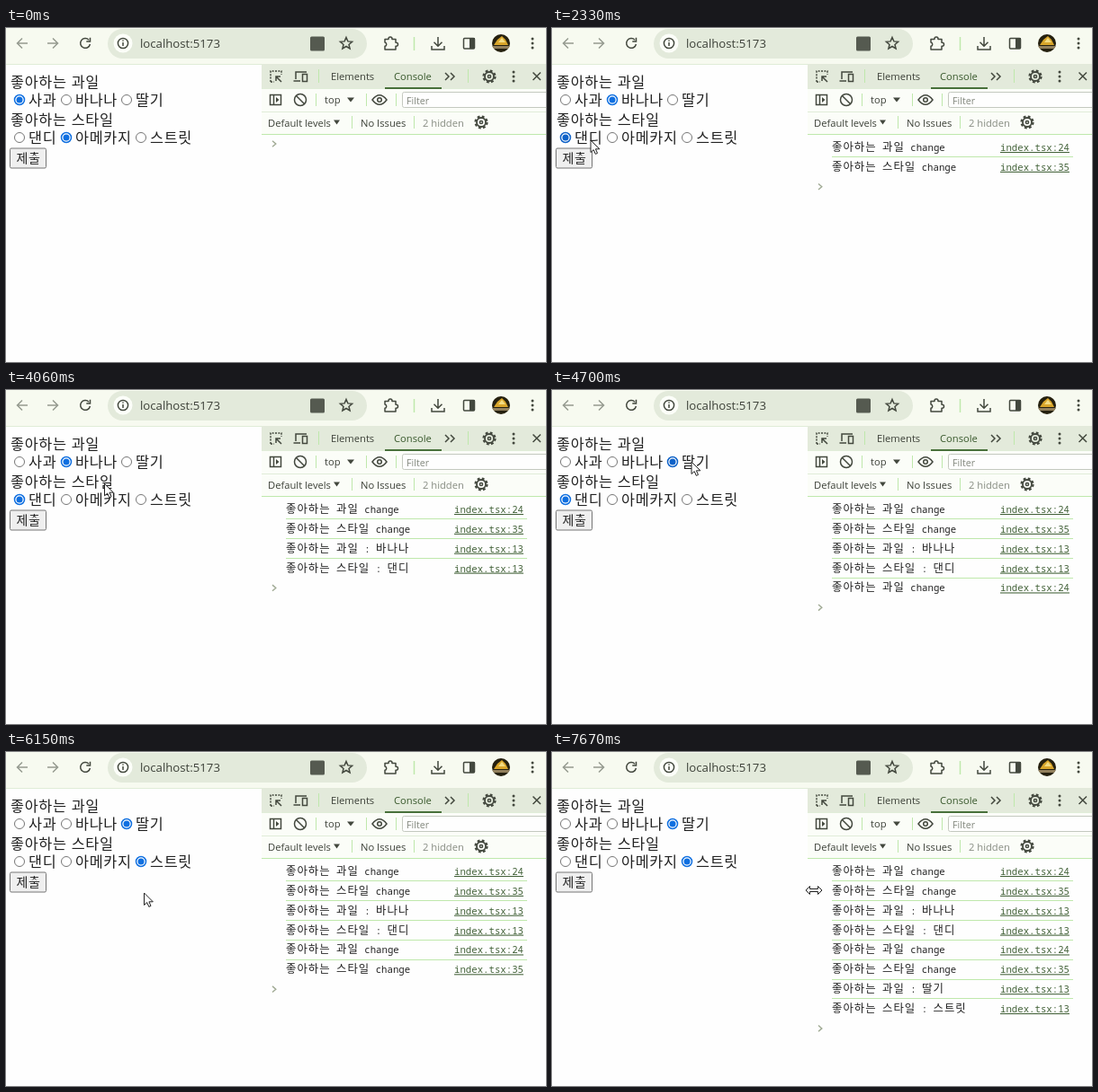
Recreate the animation shown at these times as an HTML page. Size 600 by 372 pixels, loop 7.7 s.

```html
<!DOCTYPE html>
<html lang="ko">
<head>
<meta charset="utf-8">
<title>Radio form</title>
<style>
html, body { margin: 0; width: 100%; height: 100%; overflow: hidden; background: #fefefe; }
svg { display: block; }
.ui { font: 11.2px "Open Sans", "Noto Sans", sans-serif; fill: #3c4038; }
.form { font: 16.3px "Noto Sans CJK KR", "Noto Sans CJK", sans-serif; letter-spacing: .65px; fill: #222; }
.log { font: 10.7px "Noto Sans Mono", "DejaVu Sans Mono", monospace; fill: #222; }
.log .ko { font: 12.4px "Noto Sans CJK KR", "Noto Sans CJK", sans-serif; letter-spacing: 1px; }
.link { fill: #44633a; text-decoration: underline; }
.icon { fill: none; stroke: #43483e; stroke-width: 1.5; }
.solid { fill: #43483e; stroke: none; }
.sep { stroke: #bfe8ac; fill: none; }
.edge { stroke: #e0edd8; fill: none; }
</style>
</head>
<body>
<svg width="600" height="372" viewBox="0 0 600 372">
  <defs>
    <g id="gear">
      <circle r="6.5" stroke-width="2.2" stroke-dasharray="2.8 2.3"/>
      <circle r="5" stroke-width="1.8"/><circle r="1.6"/>
    </g>
    <g id="dots" class="solid"><circle cy="-5" r="1.5"/><circle r="1.5"/><circle cy="5" r="1.5"/></g>
    <clipPath id="round"><circle cx="550" cy="17" r="10"/></clipPath>
  </defs>

  <!-- browser bar -->
  <rect width="600" height="40" fill="#f7faf0"/>
  <path class="edge" d="M0 40.5H600"/>
  <rect x="113" y="1" width="288" height="33" rx="16.5" fill="#e3eadb"/>
  <circle cx="130" cy="17" r="10.5" fill="#fcfef9"/>
  <g class="icon">
    <path style="stroke:#969b90" d="M24 17H13M18 11.5L12.5 17L18 22.5M46 17H57M52 11.5L57.5 17L52 22.5"/>
    <path d="M92 13.2A5.4 5.4 0 1 0 93.4 18M93.5 10.8V15H89.3"/>
    <circle cx="130" cy="17" r="5.6"/><path d="M130 16V20M130 13.4V14.8"/>
    <path d="M378 10.5L379.9 14.9L384.6 15.3L381 18.4L382.1 23L378 20.5L373.9 23L375 18.4L371.4 15.3L376.1 14.9Z"/>
    <path d="M421 12.5H425V12A2 2 0 0 1 429 12V12.5H433V16.3H433.5A2 2 0 0 1 433.5 20.3H433V24H421V20.3A2.2 2.2 0 0 0 421 16Z" stroke-linejoin="round"/>
    <path d="M480 10V20M475.5 15.8L480 20.3L484.5 15.8M473 20V24H487V20"/>
    <rect x="508.5" y="11.5" width="12" height="11.5" rx="1"/>
    <rect class="solid" x="515" y="11" width="6" height="12"/>
  </g>
  <rect x="338" y="9.5" width="16" height="16" rx="1.5" fill="#555a50"/>
  <path class="sep" d="M453.5 10V25" stroke-width="1.5"/>
  <g clip-path="url(#round)">
    <rect x="540" y="7" width="20" height="20" fill="#25200f"/>
    <path d="M542 19L546 13L551 9L555 13L558 19Z" fill="#d9a62b"/>
    <path d="M547 16L551 11L555 16Z" fill="#f3dc83"/>
    <rect x="540" y="20" width="20" height="3" fill="#92805c"/>
  </g>
  <use href="#dots" x="585" y="17"/>
  <text class="ui" x="149" y="22.3" style="font-size:13.2px">localhost:5173</text>

  <!-- developer tools -->
  <rect x="284" y="40" width="316" height="27.5" fill="#e3eadb"/>
  <rect x="284" y="67.5" width="316" height="51" fill="#fbfdf8"/>
  <path class="edge" d="M284 67.5H600M284 93.5H600"/>
  <path class="sep" d="M284 118.5H600"/>
  <path class="sep" d="M347.5 46V61M513.5 46V61M344.5 73V87M400.5 73V87M433.5 73V87M384.5 98V112M453.5 98V112"/>
  <rect x="421" y="66" width="63" height="2" fill="#48703a"/>
  <g class="icon">
    <path d="M294 60V48H306V52M294 60H298" stroke-dasharray="2 1.4"/>
    <path d="M306 60L300 54M300 59V54H305"/>
    <path d="M322 57V49H334M319.5 59H327"/><rect x="329.5" y="51.5" width="5" height="8"/>
    <path d="M488 50L492 54L488 58M494 50L498 54L494 58M585.5 49.5L594 58M594 49.5L585.5 58"/>
    <use href="#gear" x="537" y="54"/>
    <use href="#gear" x="528" y="105"/>
    <rect x="293.5" y="74.5" width="12" height="11"/><path d="M297.5 74.5V85.5"/>
    <path class="solid" d="M300 77L303.5 80L300 83Z"/>
    <circle cx="327" cy="80" r="6.5"/><path d="M322.5 75.5L331.5 84.5"/>
    <path d="M407 80Q415 69.5 423 80Q415 90.5 407 80Z"/><circle cx="415" cy="80" r="2.3"/>
    <path class="solid" d="M379 77.5H387L383 82.5ZM364 102.5H371L367.5 107.5Z"/>
  </g>
  <use href="#dots" x="564" y="54"/>
  <rect x="440.5" y="71.5" width="170" height="17" rx="2" fill="#fefefe" stroke="#c4c9bf"/>
  <g class="ui">
    <text x="361" y="58">Elements</text>
    <text x="431" y="58" style="fill:#38582c">Console</text>
    <text x="354" y="84">top</text>
    <text x="445" y="84.5" style="fill:#83887e;font-size:10.7px">Filter</text>
    <text x="291" y="109.8">Default levels</text>
    <text x="394" y="109.8">No Issues</text>
    <text x="463" y="109.8" style="fill:#878c82">2 hidden</text>
  </g>
  <g id="logs"></g>
  <path id="prompt" d="M296 -3.3L299.8 0L296 3.3" fill="none" stroke="#a0aa94" stroke-width="1.4"/>

  <!-- page -->
  <g class="form">
    <text x="5" y="65.5">좋아하는 과일</text>
    <text x="5" y="107.5">좋아하는 스타일</text>
    <g id="radios"></g>
    <rect id="button" x="4.5" y="134" width="40" height="22" rx="1.5"/>
    <text x="11.5" y="150.3" style="font-size:14px">제출</text>
  </g>

  <g id="cursor" fill="#fff" stroke="#222" stroke-linejoin="round">
    <path id="arrow" d="M0 0V13.5L3.2 10.6L5.3 15.4L7.5 14.4L5.4 9.8H9.8Z"/>
    <path id="resize" d="M-9 0L-4.5 -4.5V-1.5H4.5V-4.5L9 0L4.5 4.5V1.5H-4.5V4.5Z"/>
  </g>
</svg>
<script>
const LOOP = 7700, ROW = 21.86;
const $ = id => document.getElementById(id);
const set = (el, attrs) => { for (const k in attrs) el.setAttribute(k, attrs[k]); };
const show = (el, on) => { el.style.display = on ? '' : 'none'; };

// label, x, y, checked from, checked until
const radios = [
  ['사과', 15, 80, 0, 1150], ['바나나', 67, 80, 1150, 4610], ['딸기', 134, 80, 4610, LOOP],
  ['댄디', 15, 122, 2060, 5500], ['아메카지', 67, 122, 0, 2060], ['스트릿', 150, 122, 5500, LOOP]
].map(([label, x, y, from, to]) => {
  $('radios').insertAdjacentHTML('beforeend',
    `<g><circle cx="${x}" cy="${y}" r="5.5" fill="#fff"/><circle cx="${x}" cy="${y}" r="3.5"/>
     <text x="${x + 10}" y="${y + 6.2}">${label}</text></g>`);
  const [ring, dot] = $('radios').lastElementChild.children;
  return { ring, dot, x, y, from, to, right: x + 10 + label.length * 15.6 };
});

// time, message, source line
const logs = [
  [1150, '과일 change', 24], [2060, '스타일 change', 35],
  [3000, '과일 : 바나나', 13], [3000, '스타일 : 댄디', 13],
  [4610, '과일 change', 24], [5500, '스타일 change', 35],
  [6970, '과일 : 딸기', 13], [6970, '스타일 : 스트릿', 13]
].map(([time, text, line], i) => {
  const y = 137 + ROW * i;
  const body = ('좋아하는 ' + text).replace(/[가-힣]+/g, s => `<tspan class="ko">${s}</tspan>`);
  const rule = i ? `<path class="sep" d="M311 ${Math.round(y - 15.6) + .5}H579"/>` : '';
  $('logs').insertAdjacentHTML('beforeend',
    `<g class="log">${rule}<text x="311" y="${y}">${body}</text>
     <text class="link" x="498" y="${y}">index.tsx:${line}</text></g>`);
  return { time, el: $('logs').lastElementChild };
});

// time, x, y of the pointer
const path = [
  [30, 114, -6], [760, 90, 83], [1420, 90, 83], [1980, 43, 125], [2330, 43, 125],
  [2580, 43, 140], [3560, 43, 140], [4450, 155, 80], [4800, 155, 80], [5350, 155, 120],
  [5680, 155, 120], [6090, 153.5, 157], [6160, 153.5, 157], [6800, 42, 141], [7080, 42, 141],
  [7600, 291, 154], [LOOP, 291, 154]
];

function pointer(t) {
  const i = Math.max(1, path.findIndex(p => p[0] > t));
  const [t0, x0, y0] = path[i - 1], [t1, x1, y1] = path[i];
  const u = Math.max(0, (t - t0) / (t1 - t0)), e = u * u * (3 - 2 * u);
  return [x0 + (x1 - x0) * e, y0 + (y1 - y0) * e];
}

function draw(t) {
  const [px, py] = pointer(t);
  const over = (x0, y0, x1, y1) => px >= x0 && px <= x1 && py >= y0 && py <= y1;

  for (const r of radios) {
    const on = t >= r.from && t < r.to;
    const hover = over(r.x - 6, r.y - 10, r.right, r.y + 10);
    const color = on ? (hover ? '#0f62c8' : '#0f6fe0') : (hover ? '#4f4f4f' : '#767676');
    set(r.ring, { stroke: color, 'stroke-width': on ? 1.5 : 1 });
    set(r.dot, { fill: color });
    show(r.dot, on);
  }

  const hot = over(4, 134, 45, 156);
  set($('button'), { fill: hot ? '#e4e4e4' : '#efefef', stroke: hot ? '#4f4f4f' : '#767676' });

  let count = 0;
  for (const l of logs) {
    show(l.el, t >= l.time);
    count += t >= l.time;
  }
  set($('prompt'), { transform: `translate(0 ${count ? 133 + ROW * count : 129})` });

  const wide = px > 281;
  show($('cursor'), t >= 30);
  show($('arrow'), !wide);
  show($('resize'), wide);
  set($('cursor'), { transform: `translate(${px} ${py})` });
}

const start = performance.now();
function tick() {
  draw((performance.now() - start) % LOOP);
  requestAnimationFrame(tick);
}
tick();
</script>
</body>
</html>
```
